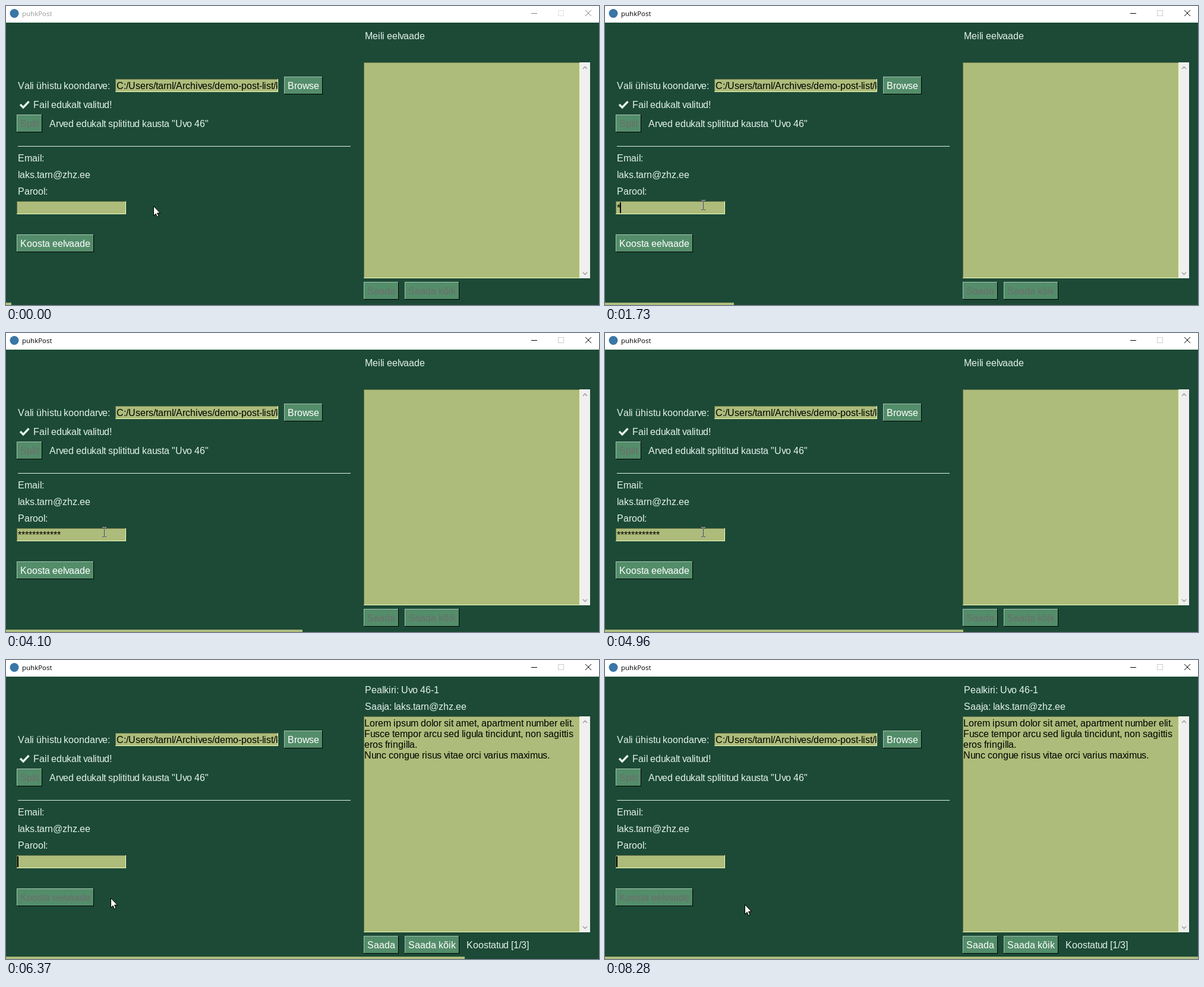
These frames come from a looping animation (998x504 px, 8.36 s). An HTML page with a canvas:

```html
<!DOCTYPE html>
<html lang="et">
<head>
<meta charset="utf-8">
<title>puhkPost</title>
<style>
html, body { margin: 0; width: 100%; height: 100%; overflow: hidden; background: #1c4a36; }
canvas { display: block; }
</style>
</head>
<body>
<canvas id="stage" width="998" height="504"></canvas>
<script>
const ctx = document.getElementById('stage').getContext('2d');
const LOOP = 8360, STEPS = 106;
const BG = '#1c4a36', FIELD = '#adbc7a', BUTTON = '#538d6a', TEXT = '#e4f1ee', DISABLED = '#6d6d6d';
const FAMILY = '"Liberation Sans", Arial, sans-serif';
const MAIL = 'laks.tarn@zhz.ee';

const FOCUS = 640, BLINK = 685, PRESS = 5800, RELEASE = 5980, READY = 6350;
const START = { x: 248, y: 337 };
const MOVES = [
  { from: 120, to: 560, x: 165, y: 335 },
  { from: 5290, to: 5640, x: 118, y: 390 },
  { from: 6130, to: 6650, x: 235, y: 412 }
];

const clamp = (v, lo, hi) => Math.min(hi, Math.max(lo, v));

// Two bursts of steady typing: five keys, a pause, then seven
function typedCount(t) {
  const burst = (start, gap, keys) => clamp(Math.floor((t - start) / gap) + 1, 0, keys);
  return t < READY ? burst(1650, 210, 5) + burst(2990, 170, 7) : 0;
}

function pointerAt(t) {
  let { x, y } = START;
  for (const m of MOVES) {
    const k = clamp((t - m.from) / (m.to - m.from), 0, 1);
    x += (m.x - x) * k;
    y += (m.y - y) * k;
  }
  return [Math.round(x), Math.round(y)];
}

function rect(x, y, w, h, color) {
  ctx.fillStyle = color;
  ctx.fillRect(x, y, w, h);
}

function line(points, color, width = 1, closed = false) {
  ctx.beginPath();
  points.forEach(([x, y]) => ctx.lineTo(x, y));
  if (closed) ctx.closePath();
  ctx.strokeStyle = color;
  ctx.lineWidth = width;
  ctx.stroke();
}

// Whole-pixel advances, as in hinted desktop text; a few letters sit tighter
const advances = {};
function advance(ch) {
  if (!advances[ch]) {
    ctx.font = '1600px ' + FAMILY;
    const w = Math.round(ctx.measureText(ch).width / 100);
    advances[ch] = 'jluvwx'.includes(ch) ? w - 1 : w;
    ctx.font = '16px ' + FAMILY;
  }
  return advances[ch];
}

function label(text, x, y, color = TEXT) {
  ctx.font = '16px ' + FAMILY;
  for (const ch of text) {
    const w = advance(ch);
    ctx.fillStyle = color;
    ctx.fillText(ch, x, y);
    x += w;
  }
}

function bevel(x, y, w, h, fill, topLeft, bottomRight) {
  rect(x, y, w, h, bottomRight);
  rect(x, y, w - 1, h - 1, topLeft);
  rect(x + 1, y + 1, w - 2, h - 2, fill);
}

function field(x, y, w, h) {
  bevel(x, y, w, h, FIELD, '#687149', '#f2ffbc');
}

function button(text, x, y, w, enabled, pressed) {
  const edges = ['#a9c6b4', '#000'];
  if (pressed) edges.reverse();
  bevel(x, y, w, 30, BUTTON, ...edges);
  label(text, x + 6, y + 21, enabled ? '#fff' : DISABLED);
}

function titleBar(active) {
  const ink = active ? '#000' : '#858585';
  rect(0, 0, 998, 28, '#fff');
  ctx.fillStyle = '#3a76a6';
  ctx.beginPath();
  ctx.arc(14, 12.5, 7.5, 0, 7);
  ctx.fill();
  ctx.font = '11.5px "Open Sans", "Noto Sans", sans-serif';
  ctx.fillStyle = active ? '#000' : '#999';
  ctx.fillText('puhkPost', 27, 17);
  rect(884, 12, 10, 1, ink);
  ctx.strokeStyle = active ? '#ccc' : '#e2e2e2';
  ctx.lineWidth = 1;
  ctx.strokeRect(929.5, 7.5, 9, 9);
  line([[975, 7], [985, 17]], ink);
  line([[985, 7], [975, 17]], ink);
}

function leftSide(t) {
  label('Vali ühistu koondarve:', 20, 140);
  field(184, 123, 274, 22);
  ctx.save();
  ctx.beginPath();
  ctx.rect(185, 124, 272, 20);
  ctx.clip();
  label('C:/Users/tarnl/Archives/demo-post-list/k', 186, 140, '#000');
  ctx.restore();
  button('Browse', 468, 119, 65, true);
  line([[24, 166], [29, 171], [38.5, 161]], TEXT, 3.4);
  label('Fail edukalt valitud!', 46, 172);
  button('Split', 18, 183, 43, false);
  label('Arved edukalt splititud kausta "Uvo 46"', 73, 204);
  rect(20, 236, 560, 1, TEXT);
  label('Email:', 20, 262);
  label(MAIL, 20, 290);
  label('Parool:', 20, 318);

  field(18, 329, 184, 22);
  const typed = typedCount(t);
  label('*'.repeat(typed), 20, 346, '#000');
  if (t >= BLINK && (t - BLINK) % 900 < 600) rect(19 + 6 * typed, 331, 2, 18, '#000');
  button('Koosta eelvaade', 18, 385, 130, t < READY, t >= PRESS && t < RELEASE);
}

function rightSide(ready) {
  label(ready ? 'Pealkiri: Uvo 46-1' : 'Meili eelvaade', 604, 56);
  field(602, 95, 364, 364);
  rect(966, 95, 17, 364, '#f0f0f0');
  line([[971, 106], [974.5, 102.5], [978, 106]], '#a3a3a3', 1.6);
  line([[971, 449], [974.5, 452.5], [978, 449]], '#a3a3a3', 1.6);
  if (ready) {
    label('Saaja: ' + MAIL, 604, 84);
    ['Lorem ipsum dolor sit amet, apartment number elit.',
      'Fusce tempor arcu sed ligula tincidunt, non sagittis',
      'eros fringilla.',
      'Nunc congue risus vitae orci varius maximus.'
    ].forEach((s, i) => label(s, 603, 112 + 18 * i, '#000'));
    label('Koostatud [1/3]', 775, 486);
  }
  button('Saada', 602, 465, 59, ready);
  button('Saada kõik', 671, 465, 92, ready);
}

function pointer(t) {
  const [x, y] = pointerAt(t);
  ctx.save();
  ctx.translate(x, y);
  if (x >= 18 && x < 202 && y >= 329 && y < 351) {
    // The text beam inverts what lies below it
    ctx.globalCompositeOperation = 'difference';
    rect(0, -7, 1, 15, '#fff');
    for (const top of [-8, 8]) {
      rect(-3, top, 3, 1, '#fff');
      rect(1, top, 3, 1, '#fff');
    }
  } else {
    const arrow = [[.5, .5], [.5, 16.5], [4, 13], [6.5, 18.5], [9, 17.5], [6.5, 12], [11.5, 12]];
    line(arrow, '#000', 1, true);
    ctx.fillStyle = '#fff';
    ctx.fill();
    line(arrow, '#000', 1, true);
  }
  ctx.restore();
}

function draw(now) {
  // Steps show slightly early, up to the last one of the loop
  const step = Math.min(STEPS - 1, Math.floor(now % LOOP * STEPS / LOOP + .4));
  const t = step * LOOP / STEPS;
  rect(0, 0, 998, 504, BG);
  titleBar(t >= FOCUS);
  leftSide(t);
  rightSide(t >= READY);
  pointer(t);
  rect(0, 500, Math.round(998 * (step + 1) / STEPS), 4, FIELD);
}

const start = performance.now();
function tick() {
  draw(performance.now() - start);
  requestAnimationFrame(tick);
}
tick();
</script>
</body>
</html>
```
